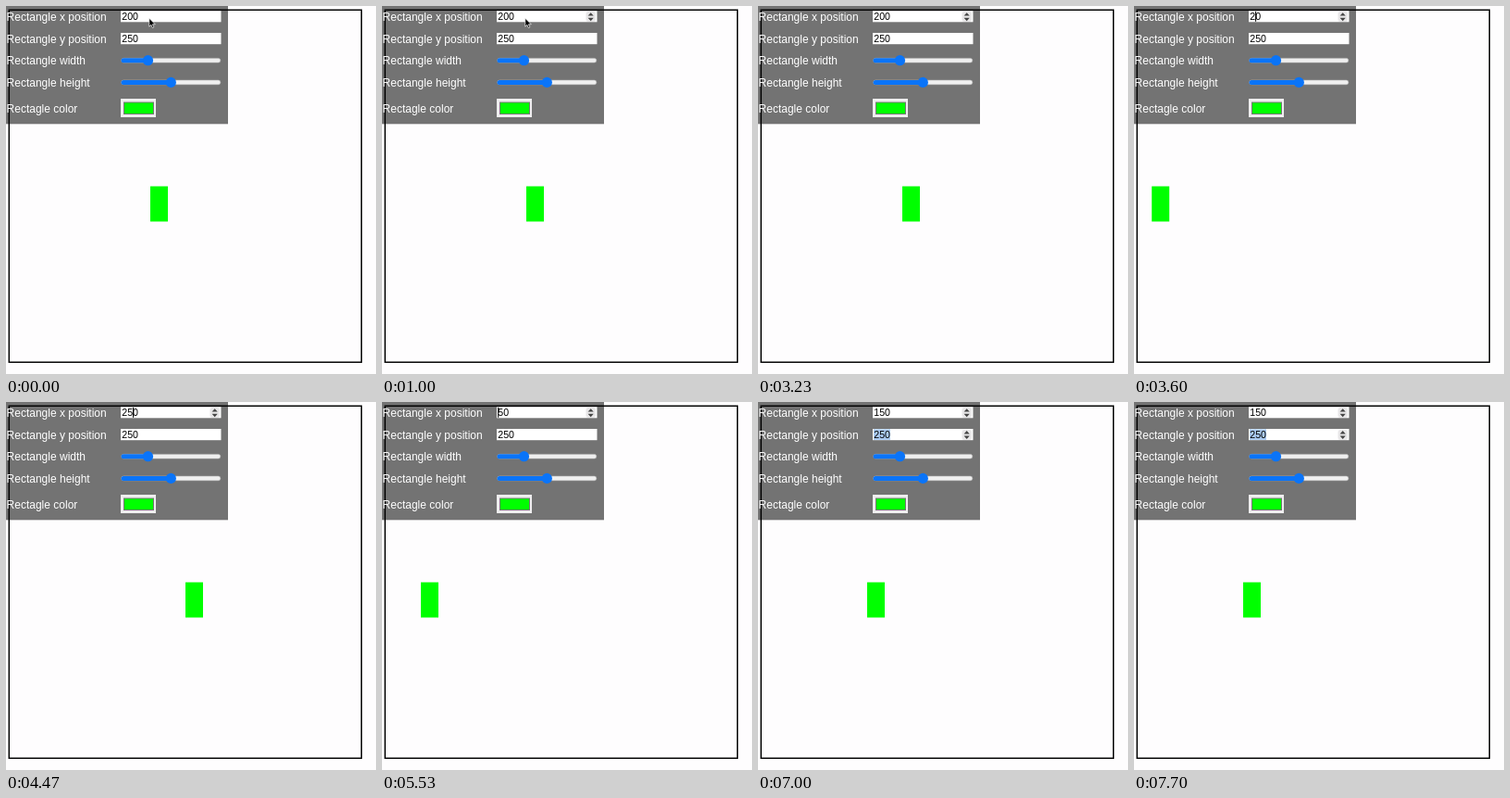
Recreate the animation shown at these times as an HTML page. Size 400 by 397 pixels, loop 8 s.

```html
<!DOCTYPE html>
<html lang="en">
<head>
<meta charset="utf-8">
<title>Rectangle controls</title>
<style>
  html, body { margin: 0; width: 100%; height: 100%; overflow: hidden; background: #fefdfe; }
  svg { display: block; width: 100%; height: 100%; }
  text { font-family: "Liberation Sans", Arial, sans-serif; white-space: pre; }
  .label { font-size: 12px; fill: #fff; }
  .value { font-size: 10.6px; fill: #000; }
</style>
</head>
<body>
<svg viewBox="0 0 400 397">
  <defs>
    <g id="spinner">
      <rect x="220.5" y="0.5" width="10.5" height="11" rx="2.5" fill="#e9e8e9"/>
      <path d="M222.6 5 L225.7 1.6 L228.8 5Z M222.6 7.2 L225.7 10.6 L228.8 7.2Z" fill="#464646"/>
    </g>
  </defs>
  <rect width="400" height="397" fill="#fefdfe"/>
  <rect id="box" y="194.5" width="19" height="38" fill="#0f0"/>
  <rect x="3.3" y="4.3" width="381" height="380" fill="none" stroke="#000" stroke-width="1.5"/>
  <rect width="240" height="127.3" fill="#000" fill-opacity=".545"/>
  <g id="panel"></g>
  <rect x="124" y="5.3" width="108.5" height="12" fill="#fff"/>
  <rect x="124" y="29" width="108.5" height="12.2" fill="#fff"/>
  <rect id="selection" x="125" y="29.3" width="18" height="11.6" fill="#a9c9f0"/>
  <text id="xValue" class="value" x="125.3" y="15.2"/>
  <text class="value" x="125.3" y="38.8">250</text>
  <use id="xSpinner" href="#spinner" y="5.6"/>
  <use id="ySpinner" href="#spinner" y="29.4"/>
  <rect id="caret" y="5.8" width="1" height="11" fill="#000"/>
  <rect x="124" y="100" width="38" height="20" fill="#efeeef"/>
  <rect x="127.5" y="104" width="32" height="12.5" fill="#0f0" stroke="#767676" stroke-width="1"/>
  <path id="pointer" d="M0 0V9L2 7.1L3.6 10.3L5.1 9.6L3.6 6.6H6.5Z"
        fill="#000" stroke="#fff" stroke-width=".7" stroke-linejoin="round"/>
</svg>
<script>
const LOOP = 8000;
const DIGIT = 5.9;
const $ = id => document.getElementById(id);

const labels = [
  ["Rectangle x position", 16.1],
  ["Rectangle y position", 39.6],
  ["Rectangle width", 63.3],
  ["Rectangle height", 87],
  ["Rectagle color", 114.6]
];

const slider = (y, thumb) => `
  <rect x="124.8" y="${y - 2.2}" width="107" height="4.6" rx="2.3" fill="#efefef" stroke="#c2c1c2" stroke-width=".6"/>
  <rect x="124.5" y="${y - 2.4}" width="${thumb - 124.5}" height="5" rx="2.5" fill="#0a74f8"/>
  <circle cx="${thumb}" cy="${y + .1}" r="5.6" fill="#0a74f8"/>`;

$("panel").innerHTML =
  labels.map(([s, y]) => `<text class="label" x="0.6" y="${y}">${s}</text>`).join("") +
  slider(58.6, 153.5) + slider(82.3, 178.3);

// Each edit: time, field value, caret index
const edits = [
  [0, 200, -1],
  [2530, 200, 3],
  [2630, 200, 2],
  [2730, 200, 1],
  [3400, 20, 1],
  [4030, 250, 2],
  [4930, 250, 1],
  [5530, 50, 0],
  [6000, 150, 1],
  [7000, 150, -1]
];

const show = (id, on) => $(id).setAttribute("visibility", on ? "visible" : "hidden");

function pointerAt(t) {
  const p = Math.min(1, Math.max(0, (t - 1370) / 600));
  const e = p * p * (3 - 2 * p);
  return `translate(${154.8 - 9.8 * e} ${13.2 - .9 * e})`;
}

function draw(t) {
  const [since, value, index] = edits.findLast(e => e[0] <= t);
  $("xValue").textContent = value;
  $("box").setAttribute("x", 156 + (value - 200) * .76);

  const blinkOn = Math.floor((t - since) / 500) % 2 === 0;
  $("caret").setAttribute("x", 125.2 + index * DIGIT);
  show("caret", index >= 0 && blinkOn);

  $("pointer").setAttribute("transform", pointerAt(t));
  show("pointer", t < 2630);
  show("xSpinner", t >= 30);
  show("ySpinner", t >= 7000);
  show("selection", t >= 7000);
}

const start = performance.now();
function tick() {
  draw((performance.now() - start) % LOOP);
  requestAnimationFrame(tick);
}
tick();
</script>
</body>
</html>
```
